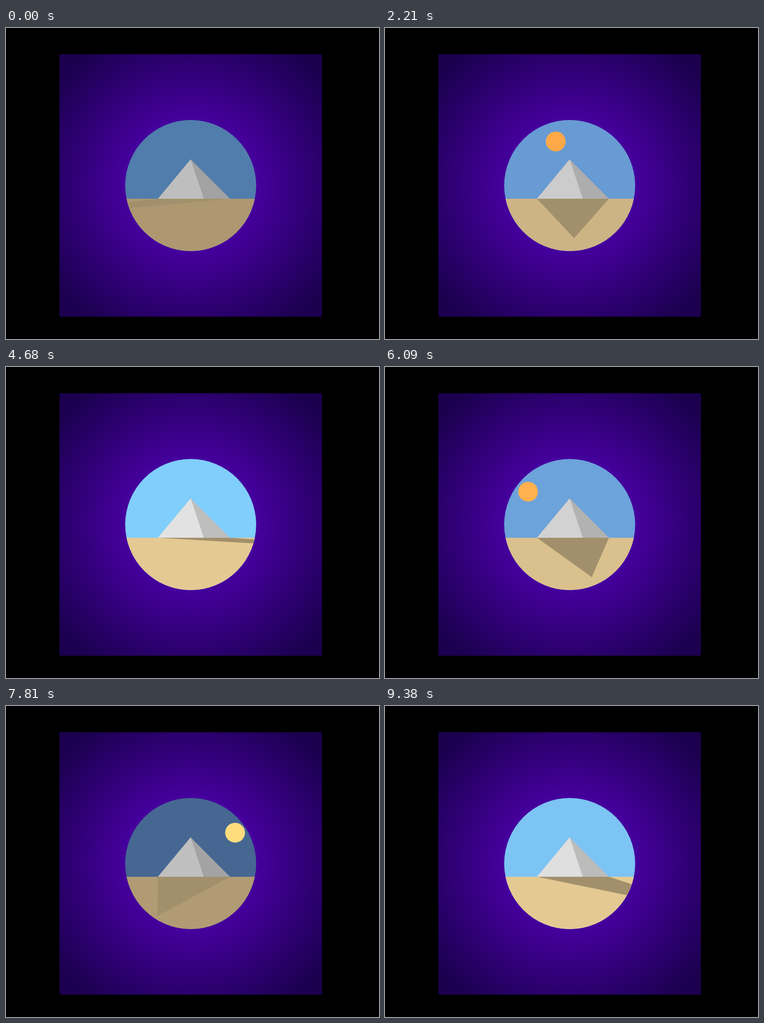
An HTML page with a canvas that plays this animation: 820x683 px, repeating every 9.4 s.

```html
<!DOCTYPE html>
<html lang="en">
<head>
<meta charset="utf-8">
<title>Pyramid day</title>
<style>
  html, body { margin: 0; width: 100%; height: 100%; overflow: hidden; background: #000; }
  canvas { display: block; }
</style>
</head>
<body>
<canvas id="stage" width="820" height="683"></canvas>
<script>
const ctx = document.getElementById('stage').getContext('2d');
const LOOP = 9400, DAY = 4445, DAWN = 148;
const CX = 406, CY = 346, RADIUS = 144, GROUND = 375, HEIGHT = 86.4;
const apex = [CX, GROUND - HEIGHT], left = [334, GROUND], ridge = [434.8, GROUND], right = [492.4, GROUND];
const sun = { pivot: 412, orbit: 165.6, radius: 21.8, lag: 4.2 };
const RAD = Math.PI / 180;

const clamp = v => Math.max(0, Math.min(1, v));
const channel = (hex, c) => parseInt(hex.slice(1 + c * 2, 3 + c * 2), 16);

function mix(a, b, k) {
  const rgb = [0, 1, 2].map(c => Math.round(channel(a, c) + (channel(b, c) - channel(a, c)) * k));
  return `rgb(${rgb})`;
}

// Blend evenly spaced colours, k running from 0 to 1
function ramp(colors, k) {
  const pos = clamp(k) * (colors.length - 1);
  const i = Math.min(colors.length - 2, Math.floor(pos));
  return mix(colors[i], colors[i + 1], pos - i);
}

// Every surface reaches its evening colour at three quarters of the day
const palette = p => ({
  sky: ramp(['#82d1fd', '#6fa8e0', '#6799d1', '#41618b', '#5281b0'], p),
  sun: ramp(['#ffc662', '#ffa646', '#ffe284', '#ff5a00'], p < 0.5 ? p / 1.5 : (p * 4 - 1) / 3),
  sand: mix('#e4c993', '#ad9872', clamp(p * 2 - 0.5)),
  lit: mix('#e3e3e3', '#bebebe', clamp(p / 0.75)),
  shade: mix('#bfbfbf', '#a2a2a2', clamp(p / 0.75)),
});

function polygon(color, ...points) {
  ctx.fillStyle = color;
  ctx.beginPath();
  points.forEach(([x, y]) => ctx.lineTo(x, y));
  ctx.fill();
}

function disc(color, x, y, r) {
  ctx.fillStyle = color;
  ctx.beginPath();
  ctx.arc(x, y, r, 0, Math.PI * 2);
  ctx.fill();
}

const glow = ctx.createRadialGradient(CX, CY, 130, CX, CY, 367);
glow.addColorStop(0, '#4800a2');
glow.addColorStop(1, '#1b004f');

function drawBackdrop() {
  ctx.fillStyle = '#000';
  ctx.fillRect(0, 0, 820, 683);
  ctx.fillStyle = glow;
  ctx.beginPath();
  ctx.roundRect(117.5, 57.5, 577, 576.5, 3);
  ctx.fill();
}

function drawScene(p) {
  const color = palette(p);
  const lean = -90 + 180 * p;
  const angle = (lean - sun.lag) * RAD;

  ctx.save();
  ctx.beginPath();
  ctx.arc(CX, CY, RADIUS, 0, Math.PI * 2);
  ctx.clip();

  ctx.fillStyle = color.sky;
  ctx.fillRect(CX - 150, CY - 150, 300, 300);
  disc(color.sun, CX + sun.orbit * Math.sin(angle), sun.pivot - sun.orbit * Math.cos(angle), sun.radius);

  ctx.fillStyle = color.sand;
  ctx.fillRect(CX - 150, GROUND, 300, 150);
  const tip = CX - HEIGHT * Math.max(-1000, Math.min(1000, Math.tan(lean * RAD)));
  polygon('#a2906c', left, right, [tip, GROUND + HEIGHT]);

  // The shaded face spans the whole pyramid so no seam shows at the ridge
  polygon(color.shade, apex, left, right);
  polygon(color.lit, apex, left, ridge);
  ctx.restore();
}

function frame() {
  const t = performance.now() % LOOP;
  drawBackdrop();
  drawScene(((t - DAWN + DAY) % DAY) / DAY);
  requestAnimationFrame(frame);
}
frame();
</script>
</body>
</html>
```
